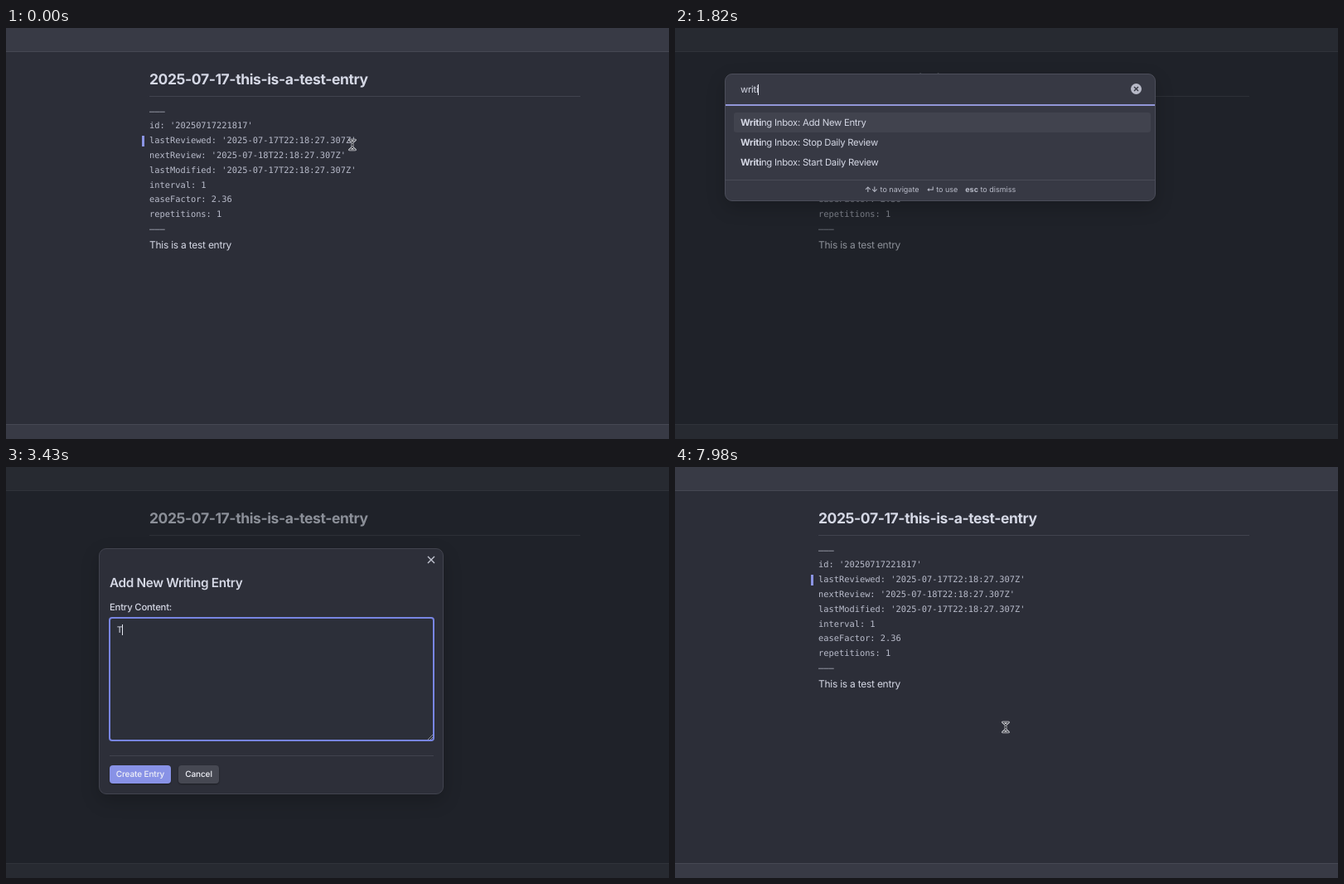
These frames come from a looping animation (800 px wide and 496 px high, 8000 ms). An HTML page:

```html
<!DOCTYPE html>
<html lang="en">
<head>
<meta charset="utf-8">
<title>Writing entry demo</title>
<style>
  html, body { margin: 0; width: 100%; height: 100%; overflow: hidden; background: #2c2e38; }
  * { box-sizing: border-box; }
  body { position: relative; color: #d5d8e5; white-space: nowrap; text-rendering: geometricPrecision;
    font: 11.3px/20px Inter, "DejaVu Sans", sans-serif; letter-spacing: -.26px; }
  #stage { position: absolute; left: 0; top: 0; width: 800px; height: 496px; overflow: hidden; }
  #stage .abs, .bar, .line, #dim, #palette, #modal, #pointer { position: absolute; }
  .mono { font: 10.36px/17.8px "DejaVu Sans Mono", monospace; letter-spacing: 0; }
  .mono, #prompt { white-space: pre; }
  .bar { left: 0; width: 100%; background: #383a45; border: 0 solid #464853; }
  .line { height: 1px; background: #41434e; }
  h1, h2 { margin: 0; line-height: 24px; }
  h1 { left: 173px; top: 51px; font-size: 17.5px; letter-spacing: -.41px; }
  #dim { inset: 0; background: rgba(10, 14, 16, .36); }

  #palette { left: 60px; top: 55px; width: 520px; background: #373944; border: 1px solid #4c4e5a;
    border-radius: 9px; box-shadow: 0 8px 22px rgba(0, 0, 0, .2); overflow: hidden; }
  #prompt { height: 38px; padding: 8px 18px; border-bottom: 2px solid #9297d8; }
  #list { position: relative; max-height: 287px; padding: 8px 5px 9px 10px; overflow: hidden; }
  .row { height: 24.05px; padding: 2px 11px 2px 8px; border-radius: 3px; display: flex; justify-content: space-between; }
  .row:first-child { background: #41434e; }
  .long .row { margin-right: 10px; }
  .long::after { content: ""; position: absolute; right: 2px; top: 2px; width: 4px; height: 67px;
    border-radius: 2px; background: #50525e; }
  .row kbd { font: 500 9px/14px Inter, "DejaVu Sans", sans-serif; letter-spacing: 0; color: #b9bbc8;
    background: #40424d; border-radius: 3px; padding: 0 4px; margin-top: 3px; height: 14px; }
  #hints { height: 25px; border-top: 1px solid #484a56; display: flex; justify-content: center; gap: 9px;
    font-size: 9px; line-height: 24px; letter-spacing: 0; color: #b8bbc8; }

  #modal { left: 112px; top: 97.5px; width: 416px; height: 297px; background: #2d2f39; border: 1px solid #42444f;
    border-radius: 9px; box-shadow: 0 8px 22px rgba(0, 0, 0, .2); }
  h2 { left: 12px; top: 29.5px; font-size: 15.3px; font-weight: 600; letter-spacing: -.35px; }
  #field { left: 10.5px; top: 82px; width: 393px; height: 150px; padding: 6px 8.5px; color: #dadde9;
    background: #2c2f39; border: 2.5px solid #7885e2; border-radius: 4px; }
  .button { top: 261.5px; height: 22px; border-radius: 4px; text-align: center; color: #f0f1f8;
    font-size: 10px; font-weight: 500; line-height: 22px; letter-spacing: -.1px; box-shadow: 0 1px 2px rgba(0, 0, 0, .4); }
  #create { left: 12px; width: 74px; background: #8892e6; }
  #create.hover { background: #7883de; }
  .caret { display: inline-block; width: 1px; height: 13px; margin-right: -1px; vertical-align: -3px; background: #e4e6f0; }
  .off { visibility: hidden; }
  svg { overflow: visible; }
</style>
</head>
<body>
<div id="stage">
  <div class="bar" style="top:0;height:29px;border-bottom-width:1px"></div>
  <div class="bar" style="top:478px;height:18px;border-top-width:1px"></div>
  <h1 class="abs">2025-07-17-this-is-a-test-entry</h1>
  <div class="line" style="left:173px;top:82px;width:520px"></div>
  <div class="abs" style="left:164px;top:130px;width:2.5px;height:13px;background:#8b94e4"></div>
  <div class="abs mono" style="left:173px;top:92.6px;color:#babdcc">–––
id: '20250717221817'
lastReviewed: '2025-07-17T22:18:27.307Z'
nextReview: '2025-07-18T22:18:27.307Z'
lastModified: '2025-07-17T22:18:27.307Z'
interval: 1
easeFactor: 2.36
repetitions: 1
–––</div>
  <div class="abs" style="left:173px;top:251.5px;font-size:12px;letter-spacing:-.25px">This is a test entry</div>
  <div id="dim"></div>

  <div id="palette">
    <div id="prompt"></div>
    <svg class="abs" style="left:489px;top:11px" width="13" height="13">
      <circle cx="6.5" cy="6.5" r="6.5" fill="#b7b9c7"/>
      <path d="M4 4l5 5m0-5l-5 5" stroke="#373944" stroke-width="1.4"/>
    </svg>
    <div id="list"></div>
    <div id="hints"><span><b>↑↓</b> to navigate</span><span><b>↵</b> to use</span><span><b>esc</b> to dismiss</span></div>
  </div>

  <div id="modal">
    <svg class="abs" style="left:396px;top:9.5px" width="8" height="8">
      <path d="M0 0l8 8m0-8l-8 8" stroke="#c3c6d2" stroke-width="1.4"/>
    </svg>
    <h2 class="abs">Add New Writing Entry</h2>
    <div class="abs" style="left:12px;top:60px;font-weight:500;letter-spacing:-.2px">Entry Content:</div>
    <div id="field" class="abs mono"></div>
    <svg class="abs" style="left:396px;top:224px" width="6" height="6">
      <path d="M0 6l6-6M3 6l3-3" stroke="#a5a7b0" stroke-width=".8"/>
    </svg>
    <div class="line" style="left:12px;top:249px;width:391px"></div>
    <div id="create" class="abs button">Create Entry</div>
    <div class="abs button" style="left:95px;width:49px;background:#464852">Cancel</div>
  </div>

  <svg id="pointer" style="left:0;top:0" width="1" height="1" fill="none" stroke-linejoin="round">
    <g id="beam">
      <path d="M-3.5-6L0-3L3.5-6ZM-3.5 6L0 3L3.5 6ZM0-3V3M-1.5 0H1.5" stroke="#e3e4ea" stroke-width="2.6"/>
      <path d="M-3.5-6L0-3L3.5-6ZM-3.5 6L0 3L3.5 6ZM0-3V3M-1.5 0H1.5" stroke="#22242b"/>
    </g>
    <path id="hand" d="M-2-6Q-.8-7 0-5.5L.8-2L3.5-1.5Q5-1 4.8 1L4 4.5V6H-1.5L-4.5 1.5Q-4.5 0-3 .3L-1.7 1.3Z"
      fill="#f2f2f5" stroke="#22242b"/>
  </svg>
</div>

<script>
const LOOP = 8000, STEP = 70, BLINK = 490;
const PALETTE_OPEN = 350, MODAL_OPEN = 2590, MODAL_CLOSE = 7210, POINTER_BACK = 6580;
const commands = [
  'Web viewer: Show history', 'Web viewer: Search the web', 'Web viewer: Open web viewer',
  'Writing Inbox: Add New Entry', 'Writing Inbox: Stop Daily Review', 'Writing Inbox: Start Daily Review',
  'Close window', 'Reload app without saving', 'Note composer: Merge current file with another file...',
  'New tab', 'Show debug info', 'Show release notes'
];
const hotkeys = { 'Close window': '⌘ ⇧ W', 'New tab': '⌘ T' };
const query = { text: 'writing', opened: PALETTE_OPEN, keys: [1120, 1610, 1680, 1750, 1820, 1890, 2030] };
const entry = { text: 'Test a new entry ', opened: MODAL_OPEN,
  keys: [3430, 4130, 4200, 4270, 4410, 4550, 4690, 4690, 4760, 4830, 4970, 5040, 5110, 5180, 5250, 5460, 5670] };

const $ = id => document.getElementById(id);
const show = (id, on) => { $(id).style.display = on ? '' : 'none'; };

// Typed text so far, with a caret whose blink restarts at every key
function typeInto(id, { text, opened, keys }, t) {
  const count = keys.filter(k => k <= t).length;
  const last = count ? keys[count - 1] : opened;
  const off = Math.floor((t - last) / BLINK) % 2;
  const value = text.slice(0, count);
  $(id).innerHTML = `${value}<i class="caret${off ? ' off' : ''}"></i>`;
  return value;
}

function renderList(value) {
  const rows = commands.flatMap(name => {
    const at = name.toLowerCase().indexOf(value), end = at + value.length;
    if (at < 0) return [];
    const label = `<span>${name.slice(0, at)}<b>${name.slice(at, end)}</b>${name.slice(end)}</span>`;
    const key = hotkeys[name] ? `<kbd>${hotkeys[name]}</kbd>` : '';
    return `<div class="row">${label}${key}</div>`;
  });
  $('list').innerHTML = rows.join('');
  $('list').className = rows.length > 11 ? 'long' : '';
}

function glide(t, start, end, from, to) {
  const p = Math.min(1, Math.max(0, (t - start) / (end - start)));
  const eased = p * p * (3 - 2 * p);
  return from.map((v, i) => v + (to[i] - v) * eased);
}

function pointerAt(t) {
  if (t < PALETTE_OPEN) return [418, 141];
  if (t < MODAL_CLOSE) return glide(t, POINTER_BACK, 6860, [418, 141], [194, 367.5]);
  return glide(t, 7630, 7980, [194, 367.5], [399, 314]);
}

function draw(now) {
  const t = Math.floor(now % LOOP / STEP) * STEP;
  const inPalette = t >= PALETTE_OPEN && t < MODAL_OPEN;
  const inModal = t >= MODAL_OPEN && t < MODAL_CLOSE;
  show('dim', inPalette || inModal);
  show('palette', inPalette);
  show('modal', inModal);
  if (inPalette) renderList(typeInto('prompt', query, t));
  if (inModal) typeInto('field', entry, t);

  const [x, y] = pointerAt(t);
  const hover = inModal && x < 199 && y > 360;
  show('pointer', t < PALETTE_OPEN || t >= POINTER_BACK);
  show('hand', hover);
  show('beam', !hover);
  $('create').className = 'abs button' + (hover ? ' hover' : '');
  $('pointer').style.transform = `translate(${x}px, ${y}px)`;
}

const start = performance.now();
function tick() {
  draw(performance.now() - start);
  requestAnimationFrame(tick);
}
tick();
</script>
</body>
</html>
```
